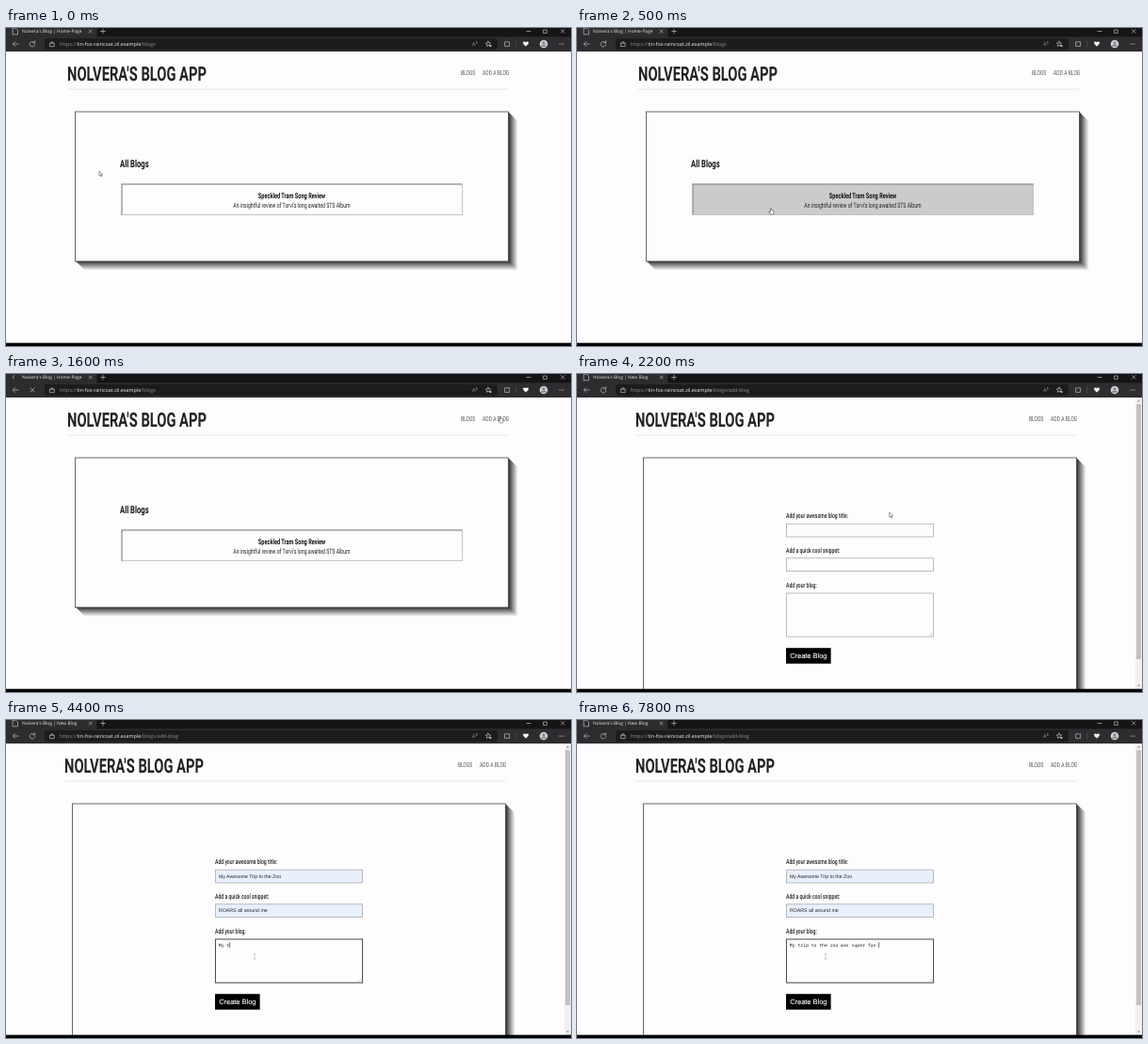
These frames come from a looping animation (600x338 px, 8 s). An HTML page:

```html
<!DOCTYPE html>
<html lang="en">
<head>
<meta charset="utf-8">
<title>Blog form</title>
<style>
  html, body { margin: 0; width: 100%; height: 100%; overflow: hidden; background: #fdfcfe; }
  svg { display: block; width: 100%; height: 100%; }
  text { text-rendering: geometricPrecision; white-space: pre; }
  .narrow { font-family: Roboto, "Liberation Sans", sans-serif; }
  .ui { font-family: "Open Sans", "Noto Sans", sans-serif; }
  .form { font-family: "Liberation Sans", Arial, sans-serif; }
  .mono { font-family: "Noto Sans Mono", "DejaVu Sans Mono", monospace; }
  .line { fill: none; stroke: #bcbcbf; stroke-width: .7; stroke-linecap: round; stroke-linejoin: round; }
  .skin { fill: #fff; stroke: #333; stroke-width: .5; }
  .dim { fill: #8a8a8f; }
</style>
</head>
<body>
<svg id="stage" viewBox="0 0 600 338" preserveAspectRatio="none"></svg>
<script>
const LOOP = 8000, STEP = 100, PAUSE = 200;
const PAPER = "#fdfcfe";
const OWNER = "Nolvera's Blog";
const HOST = "tin-fox-raincoat.zil.example";
const STORY = "My trip to the zoo was super fun.";
const CHAR = 2.862;

const group = (id, body) => `<g id="${id}">${body}</g>`;
const rect = (x, y, w, h, fill, more = "") =>
  `<rect x="${x}" y="${y}" width="${w}" height="${h}" fill="${fill}" ${more}/>`;
const outline = (x, y, w, h) => rect(x, y, w, h, "none", 'class="line"');
const disc = (x, y, r, fill) => `<circle cx="${x}" cy="${y}" r="${r}" fill="${fill}"/>`;
const path = (d, kind = "line") => `<path class="${kind}" d="${d}"/>`;
const cross = (x, y, r) =>
  path(`M${x - r} ${y - r}L${x + r} ${y + r}M${x + r} ${y - r}L${x - r} ${y + r}`);
const text = (cls, x, y, size, fill, str, more = "") =>
  `<text class="${cls}" x="${x}" y="${y}" font-size="${size}" fill="${fill}" ${more}>${str}</text>`;
// Condensed headline face
const narrow = (x, y, size, weight, fill, str, anchor = "start") =>
  `<text class="narrow" transform="translate(${x} ${y}) scale(.7 1)" font-size="${size}"
    font-weight="${weight}" fill="${fill}" text-anchor="${anchor}">${str}</text>`;

function star(x, y, r) {
  const points = [];
  for (let i = 0; i < 10; i++) {
    const a = i * Math.PI / 5, d = i % 2 ? r * .45 : r;
    points.push(`${x + d * Math.sin(a)},${y - d * Math.cos(a)}`);
  }
  return `<polygon class="line" points="${points.join(" ")}"/>`;
}

function card(height) {
  let out = "";
  for (let i = 10; i > 0; i--) {
    const g = 32 + i * 21;
    out += rect(73 + i, 88.6 + i, 460.5, height, `rgb(${g},${g},${g})`, 'rx="1"');
  }
  return out + rect(73.5, 89, 460, height, PAPER, 'stroke="#444" stroke-width=".8"');
}

const header =
  narrow(65, 55.5, 21, 700, "#222", "NOLVERA'S BLOG APP") +
  narrow(498.3, 50, 7.1, 400, "#555", "BLOGS", "end") +
  narrow(534.3, 50, 7.2, 400, "#555", "ADD A BLOG", "end") +
  rect(65, 64.7, 469, .7, "#dcdcdc");

const homePage = group("home", header + card(159) +
  narrow(121, 147.8, 10.9, 700, "#111", "All Blogs") +
  rect(123, 166, 361.5, 32.6, PAPER, 'id="item" stroke="#b9b9b9" stroke-width=".8"') +
  rect(122.6, 165.6, 362, .8, "#777") + rect(122.6, 165.6, .8, 33, "#777") +
  narrow(303.5, 180.8, 8, 700, "#111", "Speckled Tram Song Review", "middle") +
  narrow(303.5, 190.5, 7.4, 400, "#222", "An insightful review of Torvi's long awaited STS Album", "middle"));

const fields = [
  { label: "Add your awesome blog title:", top: 159.2, height: 13.8, value: "My Awesome Trip to the Zoo", focus: 2400, fill: 2900 },
  { label: "Add a quick cool snippet:", top: 195.8, height: 13.8, value: "ROARS all around me", focus: 3100, fill: 4000 },
  { label: "Add your blog:", top: 233, height: 46.2, focus: 4200, fill: Infinity }
];

const fieldRow = (f, i) =>
  narrow(222, f.top - 6.2, 7.25, 500, "#222", f.label) +
  rect(222.4, f.top, 156.2, f.height, PAPER, `id="box${i}"`) +
  (f.value
    ? text("form", 226, f.top + 8.6, 5.22, "#222", f.value, `id="value${i}"`)
    : text("mono", 225.8, f.top + 7.8, 4.77, "#222", "", 'id="story"'));

const formPage = group("new",
  `<g transform="translate(-3 0)">${header}${card(400)}</g>` +
  fields.map(fieldRow).join("") +
  path("M374.5 278L377.5 275M376.3 278L377.5 276.8") +
  rect(0, 0, .6, 5.6, "#111", 'id="caret"') +
  rect(222, 291.2, 47.6, 16.6, "#000") +
  text("form", 226.2, 302.1, 7.45, "#fff", "Create Blog", 'stroke="#fff" stroke-width=".12"') +
  rect(593, 25, 7, 311, "#f1f1f1") +
  rect(594, 32, 5, 271, "#c1c1c1") +
  path("M595 29.6H598L596.5 27.6Z", "dim") + path("M595 330.4H598L596.5 332.4Z", "dim"));

const tabBar = rect(0, 0, 600, 10, "#151517") + rect(0, -3, 96.5, 14, "#2d2d30", 'rx="3"') +
  group("doc", path("M7.5 .2H10.6L12.5 2.1V6.8H7.5Z")) +
  group("spin", path("M10 1A2.5 2.5 0 0 1 12.5 3.5")) +
  text("ui", 17, 5.3, 4.85, "#e6e6e6", "", 'id="tab"') +
  cross(89.7, 3.5, 1.5) + path("M100.6 3.5H105.4M103 1.1V5.9") +
  path("M553 3.5H557") + outline(571, 2, 3.4, 3.4) + cross(591.2, 3.4, 1.8);

const toolbar = rect(0, 9.3, 600, 15.7, "#2d2d30") + rect(41, 11, 481, 12, "#1c1c1f", 'rx="3"') +
  path("M13.2 17H7.4M9.8 14.5L7.3 17L9.8 19.5") +
  group("reload", path("M30.3 15.6A2.8 2.8 0 1 0 30.8 17.6M30.7 13.7V15.8H28.6")) +
  group("stop", cross(28, 17, 2.2)) +
  outline(46.8, 16.2, 4.4, 3.4) + path("M47.7 16.2A1.3 1.6 0 0 1 50.3 16.2") +
  `<text class="ui" x="57" y="18.8" font-size="5.4" fill="#909094">https://<tspan fill="#f0f0f0">${HOST}</tspan><tspan id="route"></tspan></text>` +
  text("ui", 495, 19, 5.6, "#98989a", "A") + path("M499.6 14.4Q501 15.4 499.8 16.6") +
  star(512, 17, 2.9) + disc(514.6, 19, 1.1, "#bcbcbf") +
  outline(530, 14.8, 4.6, 4.6) + rect(541, 13.5, .6, 7, "#55555a") +
  path("M552 19.8L549.2 17A1.6 1.6 0 0 1 552 15A1.6 1.6 0 0 1 554.8 17Z", "skin") +
  disc(571, 17, 4.3, "#cfd0d3") + disc(571, 15.8, 1.6, "#85878c") +
  path("M568 19.8A3 2.4 0 0 1 574 19.8Z", "dim") +
  [588, 590, 592].map(x => disc(x, 17, .6, "#d5d5d7")).join("");

const pointer = group("pointer",
  group("arrow", path("M0 0V5.2L1.2 4.1L2 5.9L2.9 5.5L2.1 3.8H3.7Z", "skin")) +
  group("hand", path("M-.6 .5Q0 -.4 .6 .5V2.6L3 3.3L2.6 7H-.7L-2.3 4L-.6 4.6Z", "skin")) +
  group("beam", path("M-1 -2.8H1M0 -2.8V2.8M-1 2.8H1")));

document.getElementById("stage").innerHTML =
  rect(0, 0, 600, 338, PAPER) + homePage + formPage + tabBar + toolbar +
  rect(0, 334.7, 600, 4, "#000") + pointer;

const $ = id => document.getElementById(id);
const show = (id, on) => $(id).setAttribute("visibility", on ? "inherit" : "hidden");
const set = (id, attrs) => {
  for (const name in attrs) $(id).setAttribute(name, attrs[name]);
};

// time, x, y of the pointer tip
const stops = [
  [0, 99, 152], [500, 206, 191], [700, 165, 214], [900, 102, 142], [1300, 525, 45],
  [1900, 525, 45], [2300, 296, 166], [2600, 296, 166], [3100, 288, 203],
  [3500, 288, 203], [4300, 264, 251.5], [LOOP, 264, 251.5]
];
// Each burst runs from its start to its letter count, ending a pause before the next
const bursts = [[4200, 5], [4700, 11], [5200, 19], [5800, 23], [6200, 32], [7000, 30], [7300, 33], [7700, 33]];

function pointerAt(t) {
  const i = stops.findIndex(s => s[0] > t);
  const [a, x, y] = stops[i - 1], [b, u, v] = stops[i];
  const k = (t - a) / (b - a), e = k * k * (3 - 2 * k);
  return [x + (u - x) * e, y + (v - y) * e];
}

function lettersAt(t) {
  let count = 0;
  bursts.forEach(([start, goal], i) => {
    if (t < start) return;
    const next = i + 1 < bursts.length ? bursts[i + 1][0] : LOOP;
    const k = (t - start + STEP) / (next - PAUSE - start + STEP);
    count = Math.round(count + (goal - count) * Math.min(1, k));
  });
  return count;
}

const inside = ([x, y], l, t, r, b) => x >= l && x <= r && y >= t && y <= b;

function drawBrowser(t, onForm) {
  const loading = t >= 1500 && t < 2100;
  show("doc", !loading);
  show("spin", loading);
  show("reload", !loading);
  show("stop", loading);
  set("spin", { transform: `rotate(${t * .6} 10 3.5)` });
  $("tab").textContent = `${OWNER} | ${onForm ? "New Blog" : "Home-Page"}`;
  $("route").textContent = onForm ? "/blogs/add-blog" : "/blogs";
}

function drawPointer(t, onForm) {
  const tip = pointerAt(t);
  const overItem = !onForm && inside(tip, 123, 166, 484, 198);
  const overNav = inside(tip, 503, 42, 535, 53);
  const overField = onForm && fields.some(f => inside(tip, 222, f.top, 379, f.top + f.height));
  set("item", { fill: overItem ? "#cbcbcb" : PAPER });
  set("pointer", { transform: `translate(${tip[0]} ${tip[1]})` });
  show("hand", overItem || overNav);
  show("beam", overField);
  show("arrow", !overItem && !overNav && !overField);
}

function drawForm(t) {
  const active = fields.filter(f => t >= f.focus).pop();
  fields.forEach((f, i) => {
    const filled = t >= f.fill, on = f === active;
    set("box" + i, {
      fill: filled ? "#e8f0fe" : PAPER,
      stroke: on ? "#333" : "#a2a2a2",
      "stroke-width": on ? .9 : .7
    });
    if (f.value) show("value" + i, filled);
  });

  const count = lettersAt(t);
  $("story").textContent = STORY.slice(0, count);
  show("caret", active && t < active.fill);
  if (active) set("caret", {
    x: 226 + count * CHAR,
    y: active.top + (active.value ? 4 : 3.2),
    opacity: active.value ? .3 : 1
  });
}

function draw(t) {
  const onForm = t >= 1900;
  show("home", !onForm);
  show("new", onForm);
  drawBrowser(t, onForm);
  drawPointer(t, onForm);
  drawForm(t);
}

const start = performance.now();
function tick() {
  const t = (performance.now() - start) % LOOP;
  draw(Math.floor(t / STEP) * STEP);
  requestAnimationFrame(tick);
}
draw(0);
requestAnimationFrame(tick);
</script>
</body>
</html>
```
